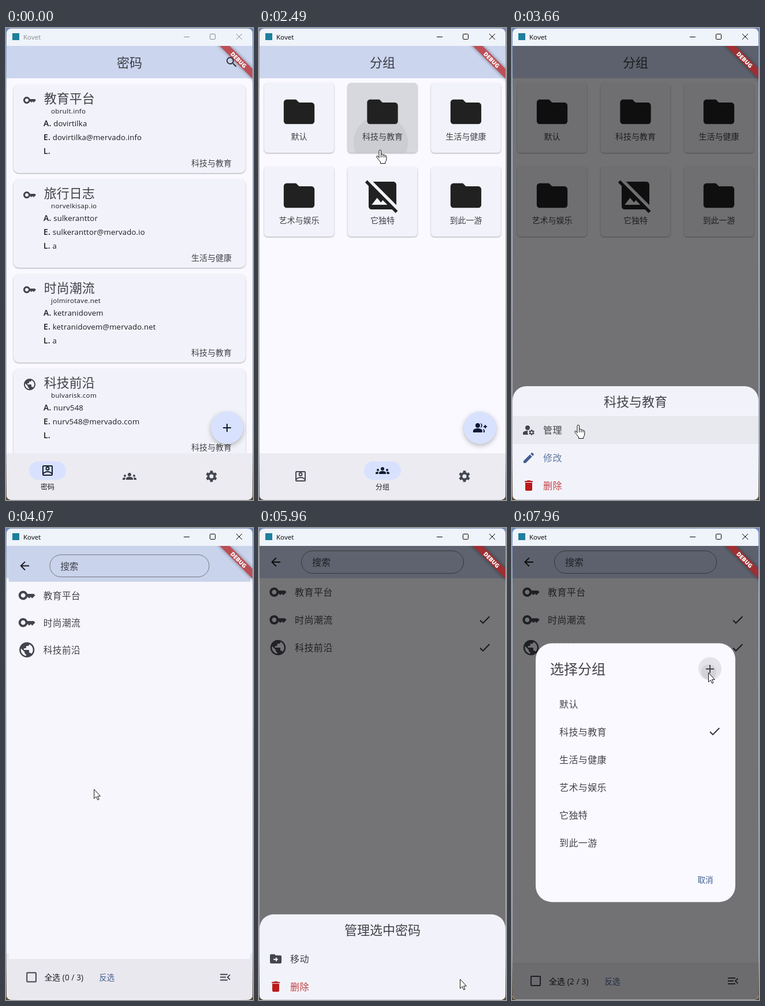
An HTML page that plays this animation: 428 px wide and 817 px high, repeating every 8000 ms.

```html
<!DOCTYPE html>
<html lang="zh">
<head>
<meta charset="utf-8">
<style>
html, body { margin: 0; width: 100%; height: 100%; overflow: hidden; }
svg { display: block; font-family: "Open Sans", "Noto Sans CJK SC", "Noto Sans CJK", sans-serif; }
text { white-space: pre; }
.card { filter: drop-shadow(0 1px 1.2px #0005); }
.fab { filter: drop-shadow(0 3px 4px #0004); }
</style>
</head>
<body>
<svg id="stage" width="428" height="817" viewBox="0 0 428 817"></svg>
<script>
const INK = '#1a1b20', SOFT = '#44464f', BLUE = '#415e91', RED = '#ba1a1a';
const PAGE = '#faf9ff', CARD = '#f2f3fa', BAR = '#cbd5ee', NAV = '#ecebf1', PILL = '#d8e2ff';

// Icons on a 24 unit grid
const ICON = {
  key: 'M21 10h-8.35C11.83 7.67 9.61 6 7 6c-3.31 0-6 2.69-6 6s2.69 6 6 6c2.61 0 4.83-1.67 5.65-4H13l2 2 2-2 2 2 4-4.04L21 10zM7 15c-1.65 0-3-1.35-3-3s1.35-3 3-3 3 1.35 3 3-1.35 3-3 3z',
  globe: 'M12 2C6.48 2 2 6.48 2 12s4.48 10 10 10 10-4.48 10-10S17.52 2 12 2zm-1 17.93c-3.95-.49-7-3.85-7-7.93 0-.62.08-1.21.21-1.79L9 15v1c0 1.1.9 2 2 2v1.93zm6.9-2.54c-.26-.81-1-1.39-1.9-1.39h-1v-3c0-.55-.45-1-1-1H8v-2h2c.55 0 1-.45 1-1V7h2c1.1 0 2-.9 2-2v-.41c2.93 1.19 5 4.06 5 7.41 0 2.08-.8 3.97-2.1 5.39z',
  account: 'M19 3H5a2 2 0 0 0-2 2v14a2 2 0 0 0 2 2h14a2 2 0 0 0 2-2V5a2 2 0 0 0-2-2zm0 2v10.79C17.39 13.94 14.73 13 12 13s-5.39.94-7 2.79V5h14zM5 19v-.77C6.74 16.09 9.3 15 12 15s5.26 1.1 7 3.23V19H5zM12 12a3.5 3.5 0 1 0 0-7 3.5 3.5 0 0 0 0 7zm0-5a1.5 1.5 0 1 1 0 3 1.5 1.5 0 0 1 0-3z',
  groups: 'M12 12.75c1.63 0 3.07.39 4.24.9 1.08.48 1.76 1.56 1.76 2.73V18H6v-1.61c0-1.18.68-2.26 1.76-2.73 1.17-.52 2.61-.91 4.24-.91zM4 13a2 2 0 1 0 0-4 2 2 0 0 0 0 4zm1.13 1.1A7 7 0 0 0 1.22 14.58 2 2 0 0 0 0 16.43V18h4.5v-1.61c0-.83.23-1.61.63-2.29zM20 13a2 2 0 1 0 0-4 2 2 0 0 0 0 4zm4 3.43a2 2 0 0 0-1.22-1.85 7 7 0 0 0-3.91-.48c.4.68.63 1.46.63 2.29V18H24zM12 6a3 3 0 1 1 0 6 3 3 0 0 1 0-6z',
  search: 'M15.5 14h-.79l-.28-.27A6.47 6.47 0 0 0 16 9.5 6.5 6.5 0 1 0 9.5 16c1.61 0 3.09-.59 4.23-1.57l.27.28v.79l5 4.99L20.49 19l-4.99-5zm-6 0a4.5 4.5 0 1 1 0-9 4.5 4.5 0 0 1 0 9z',
  add: 'M19 13h-6v6h-2v-6H5v-2h6V5h2v6h6v2z',
  folder: 'M10 4H4c-1.1 0-2 .9-2 2v12c0 1.1.9 2 2 2h16c1.1 0 2-.9 2-2V8c0-1.1-.9-2-2-2h-8l-2-2z',
  noImage: 'M21.9 21.9 2.1 2.1.69 3.51 3 5.83V19c0 1.1.9 2 2 2h13.17l2.31 2.31 1.42-1.41zM5 18l3.5-4.5 2.5 3.01L12.17 15l3 3H5zm16 .17L5.83 3H19c1.1 0 2 .9 2 2v13.17z',
  addGroup: 'M22 9V7h-2v2h-2v2h2v2h2v-2h2V9h-2zM8 12a4 4 0 1 0 0-8 4 4 0 0 0 0 8zM8 13c-2.67 0-8 1.34-8 4v3h16v-3c0-2.66-5.33-4-8-4zM12.51 4.05a6 6 0 0 1 0 7.9 4 4 0 0 0 0-7.9zM16.53 13.83C17.42 14.66 18 15.7 18 17v3h2v-3c0-1.45-1.59-2.51-3.47-3.17z',
  edit: 'M3 17.25V21h3.75L17.81 9.94l-3.75-3.75L3 17.25zM20.71 7.04a1 1 0 0 0 0-1.41l-2.34-2.34a1 1 0 0 0-1.41 0l-1.83 1.83 3.75 3.75 1.83-1.83z',
  trash: 'M6 19c0 1.1.9 2 2 2h8c1.1 0 2-.9 2-2V7H6v12zM19 4h-3.5l-1-1h-5l-1 1H5v2h14V4z',
  check: 'M9 16.17 4.83 12l-1.42 1.41L9 19 21 7l-1.41-1.41z',
  back: 'M20 11H7.83l5.59-5.59L12 4l-8 8 8 8 1.41-1.41L7.83 13H20v-2z',
  menu: 'M3 18h13v-2H3v2zm0-5h10v-2H3v2zm0-7v2h13V6H3zm18 9.59L17.42 12 21 8.41 19.59 7l-5 5 5 5L21 15.59z',
  move: 'M20 6h-8l-2-2H4c-1.1 0-2 .9-2 2v12c0 1.1.9 2 2 2h16c1.1 0 2-.9 2-2V8c0-1.1-.9-2-2-2zm-8 11v-3H8v-2h4V9l4 4-4 4z',
  box: 'M3 5a2 2 0 0 1 2-2h14a2 2 0 0 1 2 2v14a2 2 0 0 1-2 2H5a2 2 0 0 1-2-2zM5 5v14h14V5z',
  cog: cog(12, 12, 9.9),
  manage: 'M10 12a4 4 0 1 0 0-8 4 4 0 0 0 0 8zM10.67 13.02C7.9 12.8 5.3 13.7 3.39 14.82 2.5 15.34 2 16.3 2 17.35V20h9.26a7 7 0 0 1-.59-6.98z' + cog(17, 16, 5)
};

function cog(cx, cy, R) {
  let d = '';
  for (let i = 0; i < 24; i++) {
    const a = ((i >> 2) * 60 - 90 + [-13, 13, 20, 40][i % 4]) * Math.PI / 180;
    const r = i % 4 < 2 ? R : R * .74;
    d += (i ? 'L' : 'M') + (cx + r * Math.cos(a)).toFixed(2) + ' ' + (cy + r * Math.sin(a)).toFixed(2);
  }
  const h = R * .36;
  return d + `zM${cx - h} ${cy}a${h} ${h} 0 1 0 ${2 * h} 0a${h} ${h} 0 1 0 ${-2 * h} 0z`;
}

// Markup helpers; cy is the middle of the text line
const icon = (name, cx, cy, size = 24, fill = SOFT, extra = '') =>
  `<g ${extra}><path d="${ICON[name]}" fill="${fill}" fill-rule="evenodd" transform="translate(${cx - size / 2} ${cy - size / 2}) scale(${size / 24})"/></g>`;
const text = (s, x, cy, size, extra = '', fill = INK) =>
  `<text x="${x}" y="${cy + size * .37}" font-size="${size}" fill="${fill}" ${extra}>${s}</text>`;
const rect = (x, y, w, h, fill, rx = 0, extra = '') =>
  `<rect x="${x}" y="${y}" width="${w}" height="${h}" rx="${rx}" fill="${fill}" ${extra}/>`;
const clip = (id, x, y, w, h, rx = 0) => `<clipPath id="${id}">${rect(x, y, w, h, '#000', rx)}</clipPath>`;
const splash = (id, area) => `<g clip-path="url(#${area})"><circle id="${id}" fill="#000" opacity="0"/></g>`;
const MID = 'text-anchor="middle"', THIN = 'font-weight="300" fill-opacity=".82"';
const WIDE = THIN + ' letter-spacing=".4"';

const appBar = title => rect(1, 31, 426, 56, BAR) + text(title, 214, 59.5, 22, MID + ' ' + THIN);
const fab = name => `<circle class="fab" cx="383" cy="692" r="28" fill="${PILL}"/>` + icon(name, 383, 692, 24, '#0c1a35');

const entries = [
  ['key', '教育平台', 'obrult.info', 'dovirtilka', 'mervado.info', '', '科技与教育'],
  ['key', '旅行日志', 'norvelkisap.io', 'sulkeranttor', 'mervado.io', 'a', '生活与健康'],
  ['key', '时尚潮流', 'jolmirotave.net', 'ketranidovem', 'mervado.net', 'a', '科技与教育'],
  ['globe', '科技前沿', 'bulvarisk.com', 'nurv548', 'mervado.com', '', '科技与教育']
];
const groups = ['默认', '科技与教育', '生活与健康', '艺术与娱乐', '它独特', '到此一游'];

function entryCard([ic, name, site, user, host, label, group], i) {
  const y = 98 + i * 164;
  const line = (tag, s, k) => text(`<tspan font-weight="600" font-size="14">${tag}. </tspan>${s}`, 65, y + 67 + k * 24, 13.2, 'letter-spacing=".15"');
  return rect(13, y, 402, 153, CARD, 9, 'class="card"') + icon(ic, 41, y + 27) +
    text(name, 65.8, y + 24, 22, THIN) + text(site, 78, y + 45.5, 11.6, 'letter-spacing=".3"') +
    line('A', user, 0) + line('E', user + '@' + host, 1) + line('L', label, 2) +
    text(group, 391, y + 135.5, 14, 'text-anchor="end" ' + THIN);
}

function groupCard(name, i) {
  const x = 9 + i % 3 * 144.5, y = i < 3 ? 95 : 240;
  return rect(x, y, 121, 121, CARD, 6, 'class="card"') +
    (i == 1 ? rect(x, y, 121, 121, '#000', 6, 'id="press"') + splash('cardInk', 'cardArea') : '') +
    icon(i == 4 ? 'noImage' : 'folder', x + 60.5, y + 50, 64, '#212121') +
    text(name, x + 60.5, y + 92.5, 14, MID + ' ' + THIN);
}

const tab = (name, label, i) => {
  const x = 72 + i * 142;
  return (i == 1 ? rect(182, 760, 64, 32, '#000', 16, 'id="tabHover"') : '') +
    rect(-32, -16, 64, 32, PILL, 16, `id="pill${i}"`) +
    icon(name, x, 776, 24, SOFT, `id="tab${i}"`) +
    text(label, x, 794.5, 12, MID + ` id="label${i}"`);
};

const tooltip = (id, label, x) => `<g id="${id}" opacity="0">` + rect(x - 20, 708, 40, 26, '#616161', 4, 'opacity=".92"') +
  text(label, x, 721, 12, MID, '#fff') + '</g>';

const sheetRow = (ic, label, y, color, iconColor = color) => icon(ic, 29, y, 24, iconColor) + text(label, 54, y + .5, 16, WIDE, color);
const sheet = (id, y, title, hover, body) => `<g id="${id}">` + rect(1, y, 426, 260, CARD, 24) +
  rect(1, hover, 426, 48, '#000', 0, `id="${id}Hover"`) + splash(id + 'Ink', id + 'Area') +
  text(title, 214, y + 27, 22, MID + ' ' + THIN) + body + '</g>';

const manageRow = (i, k) => {
  const y = 111 + k * 48, [ic, name] = entries[i];
  return rect(1, y - 24, 426, 48, '#000', 0, `id="row${k}" opacity="0"`) +
    (k ? splash('rowInk' + k, 'rowArea' + k) + icon('check', 391, y, 24, '#33343a', `id="tick${k}" opacity="0"`) : '') +
    icon(ic, 33, y, 32) + text(name, 62, y + .5, 16, WIDE);
};

stage.innerHTML = `<defs>
  <linearGradient id="desk" x2="0" y2="1"><stop stop-color="#7189b8"/><stop offset=".15" stop-color="#b4bfd2"/>
  <stop offset=".9" stop-color="#a9adb8"/><stop offset="1" stop-color="#584a36"/></linearGradient>
  ${clip('win', 1, 1, 426, 815.5, 8)}${clip('app', 1, 31, 426, 786)}${clip('cardArea', 153.5, 95, 121, 121, 6)}
  ${clip('oneArea', 1, 672, 426, 48)}${clip('twoArea', 1, 720, 426, 48)}
  ${clip('rowArea1', 1, 135, 426, 48)}${clip('rowArea2', 1, 183, 426, 48)}</defs>` +
  rect(0, 0, 428, 817, 'url(#desk)') + '<g clip-path="url(#win)">' + rect(1, 1, 426, 30, '#eff3fa') +
  rect(11, 9, 12, 12, '#1c7f9c') +
  `<g id="caption">` + text('Kovet', 30, 16, 11.6, '', 'currentColor') +
  `<path d="M308 15.5h10M353.5 11.5a1 1 0 0 1 1-1h7a1 1 0 0 1 1 1v7a1 1 0 0 1-1 1h-7a1 1 0 0 1-1-1zM399 10l10 10M409 10l-10 10" fill="none" stroke="currentColor"/></g>` +
  '<g clip-path="url(#app)">' + rect(1, 31, 426, 786, PAGE) +
  '<g id="pageA">' + rect(1, 31, 426, 786, PAGE) + entries.map(entryCard).join('') + appBar('密码') + icon('search', 391, 59, 24, '#33353d') + fab('add') + '</g>' +
  '<g id="pageB">' + rect(1, 31, 426, 786, PAGE) + groups.map(groupCard).join('') + appBar('分组') + fab('addGroup') + '</g>' +
  rect(1, 736, 426, 81, NAV) + tab('account', '密码', 0) + tab('groups', '分组', 1) + tab('cog', '', 2) +
  tooltip('tipA', '密码', 72) + tooltip('tipB', '分组', 214) +
  '<g id="manage">' + rect(1, 31, 426, 786, PAGE) + rect(1, 31, 426, 56, BAR) + icon('back', 29, 59, 24, INK) +
  rect(73.5, 39.5, 281, 39, 'none', 19.5, 'stroke="#757780"') + text('搜索', 92, 59.5, 16, '', SOFT) +
  [0, 2, 3].map(manageRow).join('') + rect(1, 752, 426, 65, NAV) +
  icon('box', 41, 784, 24, SOFT) + text('', 64, 784.5, 13.8, 'id="count" letter-spacing=".15"') +
  text('反选', 160.5, 784.5, 13.6, 'font-weight="500"', BLUE) +
  '<circle id="menuHover" cx="383" cy="784" r="20" opacity="0"/>' + icon('menu', 383, 784) + '</g>' +
  rect(1, 31, 426, 786, '#000', 0, 'id="scrim"') +
  sheet('one', 620, '科技与教育', 672, sheetRow('manage', '管理', 696, INK, SOFT) + sheetRow('edit', '修改', 744, BLUE) + sheetRow('trash', '删除', 792, RED)) +
  sheet('two', 667, '管理选中密码', 720, sheetRow('move', '移动', 744, INK, SOFT) + sheetRow('trash', '删除', 792, RED)) +
  '<g id="dialog">' + rect(41, 199.5, 346, 448, PAGE, 28) + text('选择分组', 66, 244, 24, THIN) +
  '<circle id="addHover" cx="343" cy="243.5" r="20"/><circle id="addInk" fill="#000" opacity="0"/>' + icon('add', 343, 244) +
  groups.map((g, i) => text(g, 82, 305 + i * 48, 16, WIDE)).join('') + icon('check', 351, 352, 24, '#33343a') +
  text('取消', 335, 608.5, 13.6, MID + ' font-weight="500"', BLUE) + '</g>' +
  '<g transform="translate(427 31) rotate(45)">' + rect(-60, 28, 120, 12, '#b71c1c', 0, 'opacity=".72" style="filter:drop-shadow(0 0 3px #0009)"') +
  text('DEBUG', 0, 34, 10, MID + ' font-weight="800"', '#fff') + '</g></g></g>' +
  `<g id="cursor" fill="#fff" stroke="#111" stroke-linejoin="round">
  <path id="arrow" d="M.5 .5V16.5L4.2 13.2 6.7 18.8 9 17.8 6.6 12.3H11.3Z"/>
  <path id="hand" d="M-2 14V2a1.8 1.8 0 0 1 3.6 0V8.5a1.7 1.7 0 0 1 3.3 0V9.5a1.6 1.6 0 0 1 3.1 0V10.5a1.5 1.5 0 0 1 2.8 .5V16q0 3-2 5v2.5H.5V21q-2-2-3.5-4.5L-6 12.8q-1-2 .8-2.4 1.3 0 3.2 3.1M1.6 8.5V13M4.9 9.5V13M8 10.5V13"/></g>`;

// Cursor stops: time, x, y
const path = [
  [570, 52, 812], [760, 76, 772], [950, 100, 762], [1120, 191, 774], [1170, 191, 774], [1370, 208, 776], [1480, 208, 776],
  [2080, 210, 211], [2900, 210, 211], [3500, 118, 675], [3560, 118, 675], [3660, 115, 687], [3900, 115, 687],
  [4250, 192, 200], [4490, 192, 200], [4720, 190, 172], [4930, 190, 172], [5160, 274, 580], [5210, 274, 580],
  [5640, 383, 786], [5780, 383, 786], [6490, 167, 752], [6980, 167, 752], [7640, 330, 263], [7690, 330, 263], [7780, 340, 250]
];
const handTimes = [[0, 1580], [1900, 3020], [3340, 3980], [4130, 4970], [6370, 7040]];

const $ = id => document.getElementById(id);
const set = (id, attrs) => { for (const k in attrs) $(id).setAttribute(k, attrs[k]); };
const show = (id, opacity) => set(id, { opacity });
const shift = (id, x, y) => set(id, { transform: `translate(${x} ${y})` });
const ramp = (t, a, b) => Math.min(1, Math.max(0, (t - a) / (b - a)));
const smooth = u => u * u * (3 - 2 * u);
const out = u => 1 - (1 - u) ** 3;
const pulse = (t, a, b, c, d) => ramp(t, a, b) - ramp(t, c, d);

function cursorAt(t) {
  const i = path.findIndex(p => p[0] > t);
  if (i < 1) return i ? path[path.length - 1].slice(1) : path[0].slice(1);
  const [a, x, y] = path[i - 1], [b, u, v] = path[i], k = smooth(ramp(t, a, b));
  return [x + (u - x) * k, y + (v - y) * k];
}

function ink(id, t, start, cx, cy, r0, r1, dur, fade, alpha = .06) {
  set(id, { cx, cy, r: r0 + (r1 - r0) * ramp(t, start, start + dur), opacity: alpha * pulse(t, start, start + 30, fade, fade + 180) });
}

function draw(t) {
  $('caption').style.color = t < 570 ? '#888b90' : '#000';

  const p = out(ramp(t, 1400, 1720));
  shift('pageA', -426 * p, 0);
  shift('pageB', 426 * (1 - p), 0);
  const q = smooth(ramp(t, 1400, 1750));
  [1 - q, q, 0].forEach((a, i) => {
    set('pill' + i, { transform: `translate(${72 + i * 142} ${776 - 10 * a}) scale(${a} 1)`, opacity: a });
    shift('tab' + i, 0, -10 * a);
    $('tab' + i).firstChild.setAttribute('fill', a > .5 ? '#141d30' : SOFT);
    show('label' + i, a);
  });
  show('tabHover', .035 * pulse(t, 1050, 1110, 1420, 1520));
  show('tipA', pulse(t, 620, 700, 1000, 1090));
  show('tipB', pulse(t, 1060, 1120, 1400, 1480));

  show('press', .115 * pulse(t, 1960, 2090, 2720, 2900));
  ink('cardInk', t, 2340, 211, 198, 34, 47, 150, 2720, .05);

  const k1 = out(ramp(t, 2710, 2970)) - smooth(ramp(t, 3890, 4090));
  const k2 = out(ramp(t, 5760, 6020)) - smooth(ramp(t, 6970, 7170));
  const k3 = ramp(t, 7010, 7160);
  show('scrim', .54 * Math.max(k1, k2, k3));
  shift('one', 0, 200 * (1 - k1));
  shift('two', 0, 155 * (1 - k2));
  show('dialog', k3);
  show('oneHover', .045 * pulse(t, 3360, 3420, 3960, 4060));
  ink('oneInk', t, 3840, 115, 699, 69, 230, 220, 3920);
  show('twoHover', .045 * ramp(t, 6390, 6450) + .042 * ramp(t, 6840, 6890));
  ink('twoInk', t, 6840, 170, 748, 69, 230, 900, 6960);

  const m = out(ramp(t, 3930, 4230)), s = .88 + .12 * m;
  set('manage', { opacity: ramp(t, 3930, 4060), transform: `translate(${214 * (1 - s)} ${424 * (1 - s)}) scale(${s})` });
  show('row2', .05 * pulse(t, 4190, 4250, 4700, 4760));
  show('row1', .052 * pulse(t, 4700, 4760, 5170, 5290));
  ink('rowInk2', t, 4490, 192, 207, 69, 240, 230, 4560);
  ink('rowInk1', t, 4870, 190, 159, 69, 240, 230, 4940);
  const picked = [t >= 4530, t >= 4910];
  show('tick2', +picked[0]);
  show('tick1', +picked[1]);
  $('count').textContent = `全选 (${picked[0] + picked[1]} / 3)`;
  show('menuHover', .07 * pulse(t, 5570, 5640, 5850, 5930));

  show('addHover', .09 * ramp(t, 7560, 7630));
  ink('addInk', t, 7920, 341, 249, 9, 13, 40, 9000, .07);

  const [x, y] = cursorAt(t), isHand = handTimes.some(([a, b]) => t >= a && t < b);
  shift('cursor', x, y);
  show('cursor', +(t >= 570));
  show('hand', +isHand);
  show('arrow', +!isHand);
}

function frame() {
  draw(performance.now() % 8000);
  requestAnimationFrame(frame);
}
frame();
</script>
</body>
</html>
```
